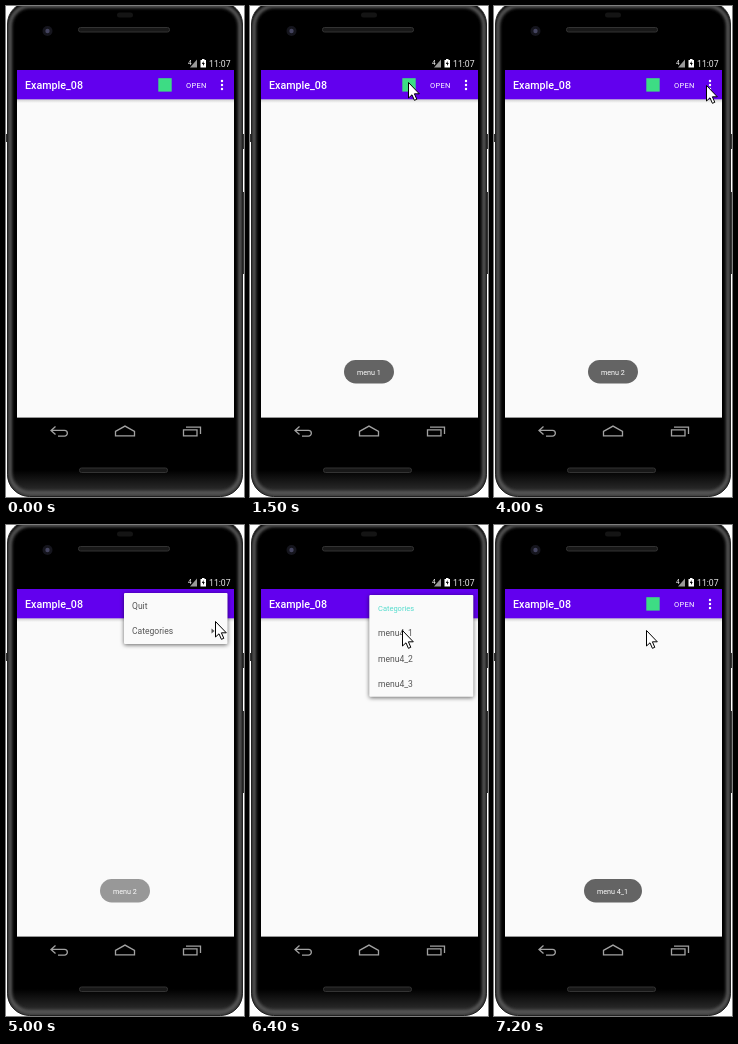
An HTML page that plays this animation: 238x491 px, repeating every 8000 ms.

```html
<!DOCTYPE html>
<html lang="en">
<head>
<meta charset="utf-8">
<title>Options menu demo</title>
<style>
  html, body { margin: 0; width: 100%; height: 100%; overflow: hidden; background: #fff; }
  svg { display: block; width: 238px; height: 491px; font-family: Roboto, sans-serif; }
  .panel { fill: #fafafa; filter: drop-shadow(0 1.5px 2px rgba(0, 0, 0, .6)); }
  .item { font-size: 8.56px; fill: #555; }
  .head { font-size: 7.5px; fill: #55dccd; }
  .nav { fill: none; stroke: #a2a2a2; stroke-width: 1.3; }
  .pill { fill: #646464; }
  .toast { font-size: 7.2px; fill: #fff; }
  .slot { fill: #181818; stroke: #333; }
</style>
</head>
<body>
<svg viewBox="0 0 238 491">
  <defs>
    <linearGradient id="drop" x2="0" y2="1">
      <stop offset="0" stop-color="#ccc"/>
      <stop offset="1" stop-color="#fafafa"/>
    </linearGradient>
    <linearGradient id="floor" x2="0" y2="1">
      <stop offset="0" stop-color="#000"/>
      <stop offset="1" stop-color="#383838"/>
    </linearGradient>
    <filter id="soft"><feGaussianBlur stdDeviation="1.6"/></filter>
    <clipPath id="shape"><rect id="body" x="1.5" y="-4" width="235" height="494.5" rx="22"/></clipPath>
  </defs>

  <!-- phone -->
  <path d="M236 128h2v15h-2zM236 186h2v82h-2zM0 128h2v8h-2z" fill="#333"/>
  <g clip-path="url(#shape)">
    <use href="#body"/>
    <rect y="464" width="238" height="27" fill="url(#floor)"/>
    <rect x="4" y="0" width="230" height="487" rx="20" fill="none" stroke="#585858" stroke-width="4" filter="url(#soft)"/>
  </g>
  <use href="#body" fill="none" stroke="#222"/>
  <rect x="111" y="6.5" width="16" height="5" rx="2.5" fill="#141414"/>
  <rect class="slot" x="72.5" y="21.5" width="91" height="4.5" rx="2"/>
  <rect class="slot" x="73.5" y="462" width="88" height="4.5" rx="2"/>
  <circle cx="41.5" cy="25" r="5" fill="#15151d"/>
  <circle cx="41.5" cy="25" r="2.2" fill="#44445f"/>

  <!-- screen -->
  <rect x="11" y="49" width="217" height="389" fill="#000"/>
  <rect x="11" y="93" width="217" height="318.6" fill="#fafafa"/>
  <rect x="11" y="93" width="217" height="4" fill="url(#drop)"/>
  <rect x="11" y="64" width="217" height="29.3" fill="#6200ee"/>
  <g fill="#fff">
    <text x="182" y="58.5" font-size="6.5">4</text>
    <path d="M191 53.5V61.5H184Z" opacity=".6"/>
    <path d="M196 53h2.5v1h1.5v7.5h-5.5v-7.5h1.5z"/>
    <path d="M197.6 55l-1.8 3h1.2v2l1.8-3h-1.2z" fill="#000"/>
    <text x="203" y="61" font-size="8.7" fill="#e4e4e4">11:07</text>
    <text x="19" y="83" font-size="10.7" font-weight="500">Example_08</text>
    <text x="180" y="81.5" font-size="7.5" letter-spacing=".3">OPEN</text>
    <path d="M216 75h0M216 79h0M216 83h0" stroke="#fff" stroke-width="2.4" stroke-linecap="round"/>
  </g>
  <rect x="152.3" y="72.2" width="13.4" height="13.4" fill="#3ddc84"/>
  <g class="nav" transform="translate(0 .4)">
    <path d="M49.5 420L45 424L49.5 428M45 424H58.5a2.8 2.8 0 0 1 0 5.7H52"/>
    <path d="M109.5 425L119 419.7L128.5 425V429.5H109.5Z"/>
    <path d="M177.5 423.5H191V429.5H177.5ZM180 420.7H194.5V427.5"/>
  </g>

  <!-- toasts -->
  <g id="toast" class="toast">
    <rect class="pill" x="94" y="354" width="50" height="23.5" rx="11.7"/>
    <text x="107" y="369">menu</text>
    <text id="one" x="126.8" y="369">1</text>
    <text id="two" x="126.8" y="369">2</text>
  </g>
  <g id="last" class="toast">
    <rect class="pill" x="90" y="354" width="58" height="23.5" rx="11.7"/>
    <text x="103" y="369">menu 4_1</text>
  </g>

  <!-- menus -->
  <g id="menu" class="item">
    <rect class="panel" x="118" y="68" width="103.5" height="51" rx="1"/>
    <text x="126" y="84">Quit</text>
    <text x="126" y="109.3">Categories</text>
    <path d="M205.5 103.5L208.5 106L205.5 108.5Z"/>
  </g>
  <g id="sub" class="item">
    <rect class="panel" x="119.3" y="70" width="104" height="101.7" rx="1"/>
    <text class="head" x="128" y="86">Categories</text>
    <text x="128" y="111.2">menu4_1</text>
    <text x="128" y="136.5">menu4_2</text>
    <text x="128" y="161.8">menu4_3</text>
  </g>

  <path id="cursor" d="M.5 .5V16L4 12.8L6.4 18.3L8.8 17.3L6.4 11.8H11.3Z" fill="#fff" stroke="#000"/>
</svg>
<script>
const LOOP = 8000, STEP = 100;
const $ = id => document.getElementById(id);

// When each part appears and disappears, and how long the fade takes.
const fades = {
  toast: { from: 1200, to: 4900, ms: 400 },
  one: { from: 0, to: 3000, ms: 300 },
  two: { from: 3000, to: LOOP, ms: 300 },
  menu: { from: 4300, to: 5500, ms: 300 },
  sub: { from: 5500, to: 6700, ms: 300 },
  last: { from: 6900, to: LOOP, ms: 400 },
  cursor: { from: 200, to: LOOP, ms: STEP }
};

// The pointer's stops: when it sets off, when it arrives, and where.
const stops = [
  { arrive: 200, x: 216, y: 55 },
  { leave: 200, arrive: 700, x: 158, y: 76 },
  { leave: 1700, arrive: 2300, x: 188, y: 79 },
  { leave: 3500, arrive: 4000, x: 212, y: 79 },
  { leave: 4800, arrive: 5200, x: 207, y: 105 },
  { leave: 5900, arrive: 6400, x: 152, y: 105 }
];

const clamp = p => Math.min(1, Math.max(0, p));
const ease = p => 1 - (1 - p) ** 1.5;

function opacity({ from, to, ms }, t) {
  const ramp = start => clamp((t - start + STEP) / ms);
  return ease(ramp(from)) * ease(1 - (t < to ? 0 : ramp(to)));
}

function pointer(t) {
  let { x, y } = stops[0];
  for (const s of stops.slice(1)) {
    const p = ease(clamp((t - s.leave) / (s.arrive - s.leave)));
    x += (s.x - x) * p;
    y += (s.y - y) * p;
  }
  return [x, y].map(Math.round);
}

function draw(now) {
  const t = Math.floor(now % LOOP / STEP) * STEP;
  for (const id in fades) $(id).setAttribute('opacity', opacity(fades[id], t));
  $('cursor').setAttribute('transform', `translate(${pointer(t)})`);
}

const origin = performance.now();
function tick() {
  draw(performance.now() - origin);
  requestAnimationFrame(tick);
}
tick();
</script>
</body>
</html>
```
